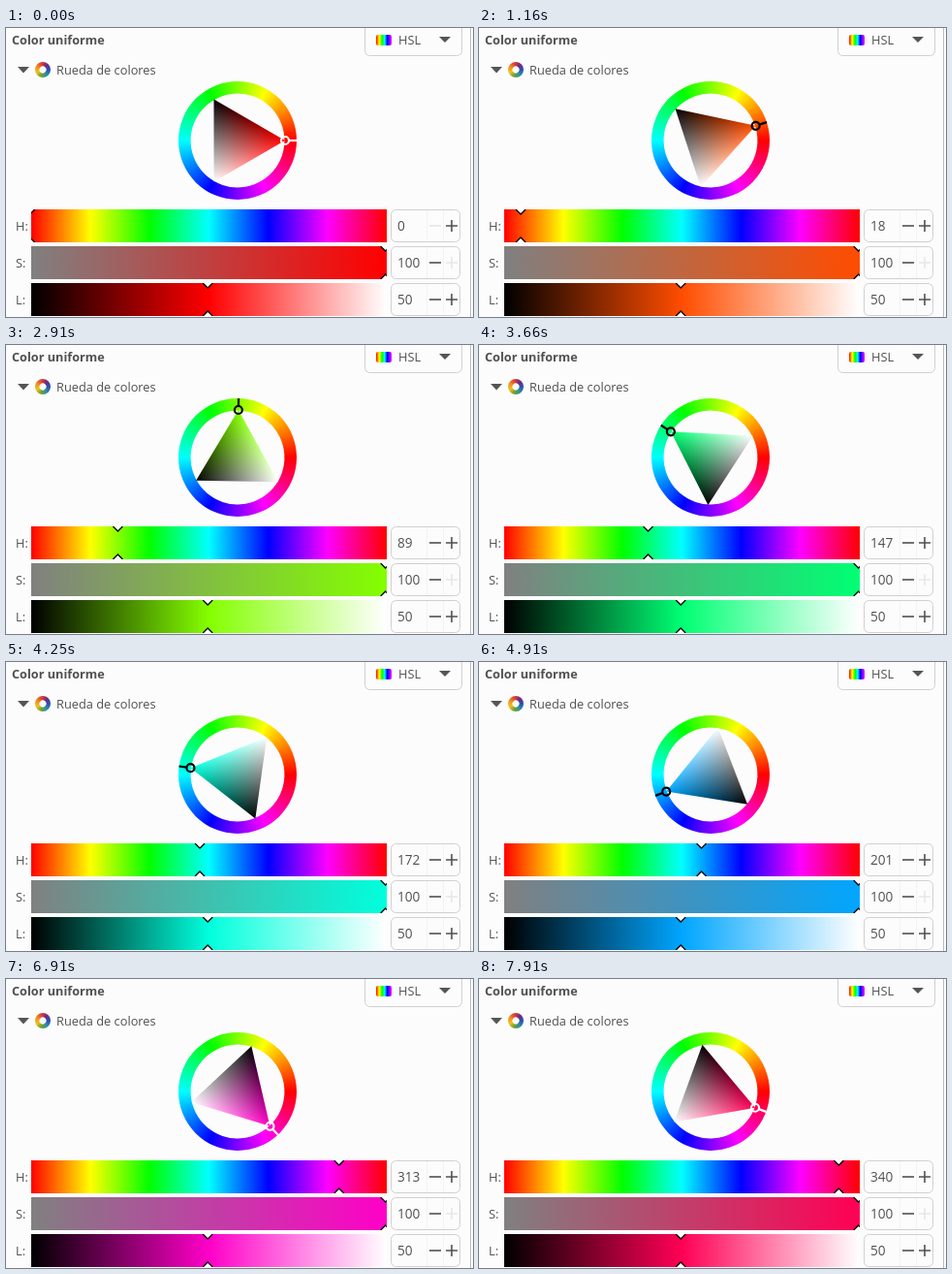
Recreate the animation shown at these times as an HTML page with a canvas. Size 482 by 298 pixels, loop 8 s.

```html
<!DOCTYPE html>
<html lang="es">
<head>
<meta charset="utf-8">
<title>Color uniforme</title>
<style>
  html, body { margin: 0; width: 100%; height: 100%; overflow: hidden; background: #fcfcfc; }
  canvas, svg { position: absolute; left: 0; top: 0; }
  text { font: 12.8px "Open Sans", "Noto Sans", sans-serif; fill: #505050; }
  .title { font-size: 12.7px; font-weight: 700; }
  .value { font-size: 13.6px; }
  .box { fill: none; stroke: #d0d0d0; }
  .rule { stroke: #f3f3f3; }
  .sign { stroke: #505050; stroke-width: 1.6; }
  .off { stroke: #e6e6e6; }
  .arrow { fill: #555; }
</style>
</head>
<body>
<canvas id="stage" width="482" height="298"></canvas>
<svg width="482" height="298">
  <defs>
    <linearGradient id="rainbow">
      <stop offset="0" stop-color="#f00"/><stop offset=".2" stop-color="#ff0"/>
      <stop offset=".4" stop-color="#0f0"/><stop offset=".55" stop-color="#0ff"/>
      <stop offset=".72" stop-color="#00f"/><stop offset="1" stop-color="#f0f"/>
    </linearGradient>
    <g id="spin">
      <rect class="box" x="397.5" y=".5" width="71" height="33" rx="5"/>
      <path class="rule" d="M434.5 1v32M451.5 1v32"/>
    </g>
    <path id="minus" d="M437 17h12"/>
    <path id="plus" d="M454 17h12M460 11v12"/>
  </defs>
  <path d="M479.5 0V298" stroke="#bcbcbc"/>
  <text class="title" x="6" y="17">Color uniforme</text>
  <rect class="box" x="370.5" y="-8" width="100" height="36.5" rx="5"/>
  <rect x="382" y="7" width="16" height="11" rx="2" fill="url(#rainbow)"/>
  <text x="405" y="17">HSL</text>
  <path class="arrow" d="M447 9h12l-6 6z"/>
  <path class="arrow" d="M12 40h12l-6 6.5z"/>
  <text x="52" y="48">Rueda de colores</text>

  <g transform="translate(0 187)">
    <use href="#spin"/><use id="hueMinus" class="sign" href="#minus"/><use class="sign" href="#plus"/>
    <text x="10" y="22">H:</text><text id="hueText" class="value" x="404" y="22">0</text>
  </g>
  <g transform="translate(0 225)">
    <use href="#spin"/><use class="sign" href="#minus"/><use class="sign off" href="#plus"/>
    <text x="10" y="22">S:</text><text class="value" x="404" y="22">100</text>
  </g>
  <g transform="translate(0 263)">
    <use href="#spin"/><use class="sign" href="#minus"/><use class="sign" href="#plus"/>
    <text x="10" y="22">L:</text><text class="value" x="404" y="22">50</text>
  </g>
</svg>
<script>
const LOOP = 8000, TICK = 1000 / 12;
const CX = 239, CY = 116, OUTER = 61, INNER = 48.4, CORNER = 49;
const BAR = { x: 26, w: 367, h: 34 };

// [tick, hue] pairs, joined by straight lines; negative hues wrap
const KEYS = [[5, 0], [6, -1], [8, -2], [9, -2], [10, 2], [19, 38], [21, 42], [22, 42],
  [24, 48], [28, 72], [32, 72], [42, 130], [44, 147], [59, 201], [60, 201],
  [63, 211], [64, 211], [71, 240], [83, 313], [95, 340]];

const ctx = document.getElementById('stage').getContext('2d');
const hueText = document.getElementById('hueText');
const hueMinus = document.getElementById('hueMinus');

const pure = h => `hsl(${h}, 100%, 50%)`;
const spectrum = [0, 60, 120, 180, 240, 300, 360].map(pure);
const wheel = [...spectrum].reverse();
// Clockwise from the right
const iconColors = ['#2a4fb0', '#2a8fa8', '#6aa030', '#f0c020', '#f09020', '#e04030', '#702a80', '#2a4fb0'];

function hueAt(time) {
  const tick = Math.floor((time + 8) / TICK);
  const next = KEYS.findIndex(k => k[0] > tick);
  if (next === 0) return 0;
  if (next < 0) return KEYS.at(-1)[1];
  const [t0, h0] = KEYS[next - 1], [t1, h1] = KEYS[next];
  return (Math.round(h0 + (h1 - h0) * (tick - t0) / (t1 - t0)) + 360) % 360;
}

function addStops(gradient, colors) {
  colors.forEach((c, i) => gradient.addColorStop(i / (colors.length - 1), c));
  return gradient;
}

function polar(hue, r) {
  const a = hue * Math.PI / 180;
  return [CX + r * Math.cos(a), CY - r * Math.sin(a)];
}

function ring(x, y, outer, inner, colors) {
  ctx.beginPath();
  ctx.arc(x, y, outer, 0, 7);
  ctx.arc(x, y, inner, 7, 0, true);
  ctx.fillStyle = addStops(ctx.createConicGradient(0, x, y), colors);
  ctx.fill('evenodd');
}

// Black triangle plus the light added by its coloured and white corners
function triangle(hue) {
  const corners = [0, 120, 240].map(d => polar(hue + d, CORNER));
  const glow = (offset, color) => addStops(ctx.createLinearGradient(
    ...polar(hue + offset, CORNER), ...polar(hue + offset + 180, CORNER / 2)), [color, '#000']);
  ctx.beginPath();
  corners.forEach(p => ctx.lineTo(...p));
  ctx.closePath();
  ctx.fillStyle = '#000';
  ctx.fill();
  ctx.globalCompositeOperation = 'lighter';
  for (const fill of [glow(0, pure(hue)), glow(240, '#fff')]) {
    ctx.fillStyle = fill;
    ctx.fill();
  }
  ctx.globalCompositeOperation = 'source-over';
}

function handle(hue) {
  const channel = shift => {
    const k = (shift + hue / 30) % 12;
    return 0.5 - 0.5 * Math.max(-1, Math.min(k - 3, 9 - k, 1));
  };
  const light = 0.3 * channel(0) + 0.59 * channel(8) + 0.11 * channel(4);
  ctx.strokeStyle = light > 0.45 ? '#000' : '#fff';
  ctx.lineWidth = 2.2;
  ctx.beginPath();
  ctx.moveTo(...polar(hue, CORNER + 4));
  ctx.lineTo(...polar(hue, OUTER));
  ctx.stroke();
  ctx.beginPath();
  ctx.arc(...polar(hue, CORNER), 4, 0, 7);
  ctx.stroke();
}

function slider(y, colors, value) {
  const { x, w, h } = BAR, mx = x - 1.3 + w * value;
  ctx.save();
  ctx.beginPath();
  ctx.rect(x, y, w, h);
  ctx.clip();
  ctx.fillStyle = addStops(ctx.createLinearGradient(x, 0, x + w, 0), colors);
  ctx.fillRect(x, y, w, h);
  ctx.fillStyle = '#fff';
  ctx.strokeStyle = '#000';
  ctx.lineWidth = 1.3;
  for (const [edge, dir] of [[y, 1], [y + h, -1]]) {
    ctx.beginPath();
    ctx.moveTo(mx - 5, edge);
    ctx.lineTo(mx, edge + 5 * dir);
    ctx.lineTo(mx + 5, edge);
    ctx.fill();
    ctx.stroke();
  }
  ctx.restore();
}

function draw() {
  const hue = hueAt(performance.now() % LOOP);
  ctx.fillStyle = '#fcfcfc';
  ctx.fillRect(0, 0, 482, 298);
  ring(38, 43, 8, 3.5, iconColors);
  ring(CX, CY, OUTER, INNER, wheel);
  triangle(hue);
  handle(hue);
  slider(187, spectrum, hue / 360);
  slider(225, ['#808080', pure(hue)], 1);
  slider(263, ['#000', pure(hue), '#fff'], 0.5);
  hueText.textContent = hue;
  hueMinus.classList.toggle('off', hue === 0);
  requestAnimationFrame(draw);
}
draw();
</script>
</body>
</html>
```
